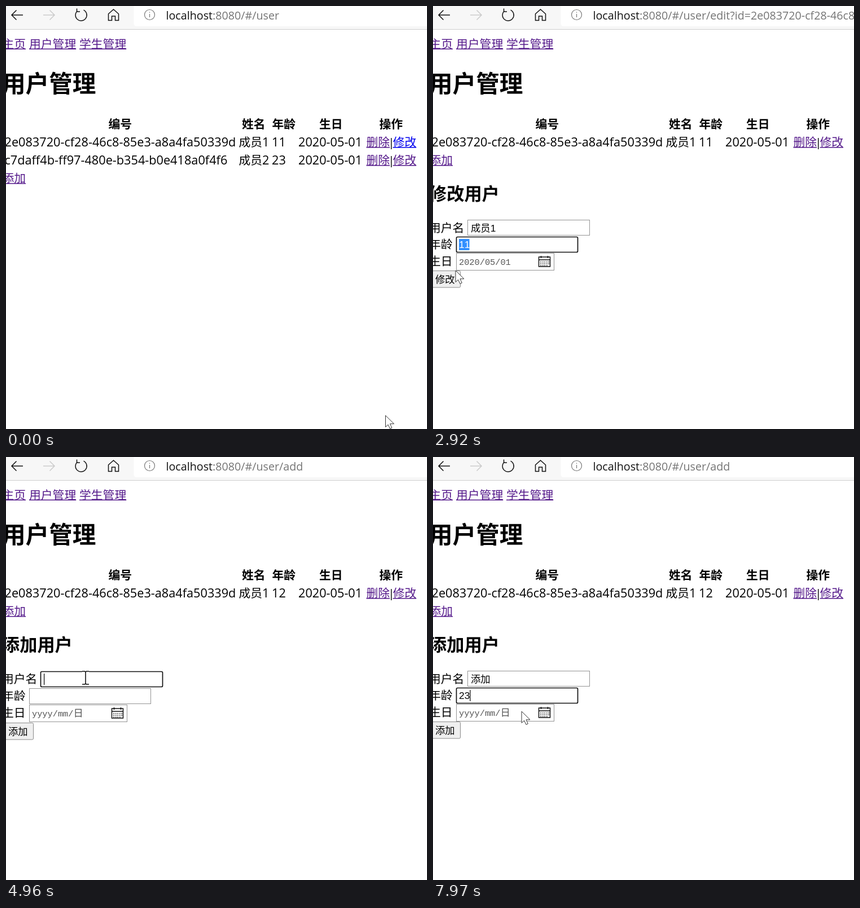
An HTML page for the animation above (8 s loop, 746x750 px).

```html
<!DOCTYPE html>
<html lang="zh-CN">
<head>
<meta charset="utf-8">
<title>用户管理</title>
<style>
  html, body { margin: 0; width: 100%; height: 100%; overflow: hidden; background: #fff; }
  svg { display: block; width: 746px; height: 750px; overflow: hidden; }
  text { font-family: "Open Sans", "Noto Sans CJK SC", "Noto Sans CJK", sans-serif; font-kerning: none; white-space: pre; }
  .b { font-weight: 700; }
  .field { font-family: "Liberation Sans", "Noto Sans CJK SC", "Noto Sans CJK", sans-serif; }
  .date { font-family: "Liberation Mono", "Noto Sans CJK SC", "Noto Sans CJK", monospace; }
  .line { fill: none; stroke: #111; stroke-width: 1.5; }
</style>
</head>
<body>
<svg viewBox="0 0 746 750">
  <rect width="746" height="42" fill="#f7f7f7"/>
  <path d="M0 41.5H746" stroke="#cfcfcf"/>
  <path d="M226.500 0V31Q226.500 36 231.500 36H746V0Z" fill="#fff"/>
  <g class="line">
    <path d="M30 16H10M18.500 7.500L10 16L18.500 24.500"/>
    <path d="M66 16H86M77.500 7.500L86 16L77.500 24.500" stroke="#ccc"/>
    <path d="M137.500 7.200A10 10 0 1 1 126.500 8.700M125.500 4.500V10H131"/>
    <path d="M181.500 14L190.500 6L199.500 14V25.500H193.500V18H187.500V25.500H181.500Z"/>
    <g stroke="#777" stroke-width="1.200">
      <circle cx="254.500" cy="15.500" r="9"/>
      <path d="M254.500 14V20M254.500 10.500V12"/>
    </g>
  </g>
  <g id="page"></g>
</svg>
<script>
const LOOP = 8000;
const ID1 = '2e083720-cf28-46c8-85e3-a8a4fa50339d';
const ID2 = 'c7daff4b-ff97-480e-b354-b0e418a0f4f6';
const HAN = 20.8, LATIN = 21.7, SMALL = 17.33;
const VISITED = '#551a8b', FRESH = '#0000ee', ACTIVE = '#ff0000';

// Pointer legs: start, end, steps, x, y, optional bend x, y
const START = [672.5, 726];
const LEGS = [
  [70, 500, 7, 646, 273, 745, 520],
  [1330, 1620, 5, 705, 245],
  [1900, 2060, 3, 553, 393],
  [2140, 2370, 4, 47, 419],
  [2840, 2920, 2, 40, 469],
  [3000, 3080, 2, 22, 492],
  [3460, 3460, 1, 22, 494],
  [3660, 4250, 8, 17, 282],
  [4550, 4890, 5, 141, 391],
  [7740, 7970, 4, 157, 451]
];
const PRESSES = [[880, 1050], [1700, 1840], [2600, 2670], [2740, 2800], [3460, 3590], [4320, 4470], [4890, 4960]];

// Input-method steps: time, composed text, candidates
const TI = [...'体提题替踢梯啼'], TIAN = [...'天填田甜添舔恬'];
const WORDS = '添加 天价 田家 田佳 天假 天加 天家'.split(' ');
const TYPING = [
  [5650, 't'], [5800, 'ti'], [6210, 'ti', TI], [6350, 'tia', TIAN], [6430, 'tian', TIAN],
  [6580, "tian'j", WORDS], [6730, "tian'ji", WORDS], [6820, "tian'jia", WORDS]
];

const text = (x, y, s, size = HAN, attrs = '') =>
  `<text x="${x}" y="${y}" font-size="${size}" ${attrs}>${s}</text>`;
const bold = (x, y, s, size) => text(x, y, s, size, 'class="b"');
const rect = (x, y, w, h, attrs) =>
  `<rect x="${x}" y="${y}" width="${w}" height="${h}" ${attrs}/>`;
const link = (x, y, s, color = VISITED) =>
  text(x, y, s, HAN, `fill="${color}"`) + rect(x, y + 1, HAN * s.length, 1.5, `fill="${color}"`);
const box = (x, y, w, h, focus) => rect(x + .5, y + .5, w, h,
  `fill="#fff" rx="${focus ? 2 : 0}" stroke="${focus ? '#111' : '#949494'}" stroke-width="${focus ? 1.7 : 1}"`);
const caret = (x, y) => rect(x, y, 1.2, 20, 'fill="#000"');
const within = (t, a, b) => t >= a && t < b;
const pressed = t => PRESSES.some(([a, b]) => within(t, a, b));

function pointerAt(t) {
  let [x, y] = START;
  for (const [a, b, n, tx, ty, bx, by] of LEGS) {
    if (t < a) break;
    const k = b > a ? Math.floor((t - a) / (b - a) * (n - 1) + 1e-6) + 1 : n;
    const p = Math.min(1, k / n), q = 1 - p;
    const mx = bx ?? (x + tx) / 2, my = by ?? (y + ty) / 2;
    x = q * q * x + 2 * q * p * mx + p * p * tx;
    y = q * q * y + 2 * q * p * my + p * p * ty;
  }
  return [x, y];
}

function tableRow(y, id, name, age, del, edit) {
  return text(-2.5, y, id, LATIN) +
    text(412.5, y, `${name[0]}<tspan font-size="${LATIN}">${name[1]}</tspan>`) +
    text(471, y, age, LATIN) + text(518, y, '2020-05-01', LATIN) +
    link(638.5, y, '删除', del) + text(682.7, y, '|', 20, 'text-anchor="middle"') +
    link(685.5, y, '修改', edit);
}

function calendar(y) {
  let dots = '';
  for (let i = 0; i < 14; i++)
    dots += rect(190.5 + i % 5 * 3.5, y + 10 + Math.floor(i / 5) * 3.2, 1.5, 1.5, 'fill="#111"');
  return `<path class="line" d="M187.500 ${y + 2}h20v17h-20zM187.500 ${y + 7}h20M191.500 ${y}v4M203.500 ${y}v4"/>` + dots;
}

function form(t, adding) {
  const typed = adding ? TYPING.filter(s => s[0] <= t).pop() : null;
  const empty = adding && t < 6970;
  const d = empty ? 1 : 0;
  const onName = adding && within(t, 4890, 7500);
  const onAge = adding ? t >= 7500 : t >= 2600;
  const field = (x, y, s, attrs = '') => text(x, y, s, SMALL, 'class="field" ' + attrs);
  let out = bold(-7, 344, adding ? '添加用户' : '修改用户', 31.2) +
    text(-7, 401, '用户名') + box(61, 379 + d, 216, 27, onName);

  if (!adding) out += field(67, 399.5, '成员1');
  else if (!empty) out += field(67, 399.5, '添加') + (onName ? caret(102, 384) : '');
  else if (typed) {
    const w = [...typed[1]].reduce((sum, c) => sum + ({ t: .278, i: .222, j: .222, "'": .191 }[c] || .556), 0) * SMALL;
    out += field(67, 399.5, typed[1]) + caret(67 + w, 384) +
      `<path d="M67 403H${67 + w}" stroke="#111" stroke-dasharray="1.500 1.500"/>`;
  } else if (within(t, 4890, 5420)) out += caret(67, 384);

  out += text(-7, 430 + d, '年龄') + box(41, 409 + d, 215, 27, onAge);
  const age = adding ? (t < 7580 ? '' : t < 7660 ? '2' : '23') : t < 3200 ? '11' : t < 3320 ? '1' : '12';
  const selected = !adding && within(t, 2740, 3200);
  if (selected) out += rect(46, 413, 18.5, 20, 'fill="#3390ff"');
  out += field(46, 429, age, selected ? 'fill="#fff"' : '');
  if (onAge && !selected) out += caret(46 + age.length * .556 * SMALL, 413);

  out += text(-7, 460 + d, '生日') + box(41, 438 + d, 173, 30) +
    text(46, 459 + d, adding ? `yyyy/mm/<tspan font-size="${SMALL}">日</tspan>` : '2020/05/01', 15.3, 'class="date" fill="#555"') +
    calendar(443 + d);
  const by = 469 + 2 * d;
  out += rect(-8, by + .5, 56.5, 29.5, 'rx="2" fill="#efefef" stroke="#8a8a8a"') +
    text(4, by + 22, adding ? '添加' : '修改', SMALL);
  if (empty && typed && typed[2]) out += candidates(typed[2]);
  return out;
}

function candidates(list) {
  const wide = list[0].length > 1;
  const pitch = wide ? 101 : 78.3, end = wide ? 775 : 614;
  let out = rect(63.5, 407.5, end + 57 - 63.5, 55.5, 'fill="#fff" stroke="#1a7fd4" stroke-width="1.500"') +
    rect(63.5, 407, wide ? 102.5 : 79.5, 56.5, 'fill="#0078d7"');
  list.forEach((s, i) => {
    const x = 86 + i * pitch;
    out += text(x - .5, 444.5, i + 1, 16, `fill="${i ? '#808080' : '#fff'}"`) +
      text(x + 13, 446, s, 23, `fill="${i ? '#111' : '#fff'}"`);
  });
  const cx = end + 28;
  return out + `<path d="M${end} 407.500V463" stroke="#1a7fd4" stroke-width="1.500"/>
    <g class="line"><circle cx="${cx}" cy="435.500" r="10.500"/><path d="M${cx - 6} 438Q${cx} 445 ${cx + 6} 438"/></g>
    <circle cx="${cx - 4}" cy="432" r="1.500"/><circle cx="${cx + 4}" cy="432" r="1.500"/>`;
}

const SHAPES = {
  arrow: '<path d="M0 0V20.500L4.600 16.300L8 23.500L11.300 22L8 14.800H15Z" fill="#fff" stroke="#333"/>',
  hand: '<path d="M-2 16V2Q-2 0 0 0T2 2V9Q4 7.500 6 9.500Q8 8.500 9.500 10.500Q13.500 10 13.500 13.500V20Q13.500 29 5 29H3Q-1 29 -3 25L-7.500 17.500Q-8 14 -5 14Z" fill="#fff" stroke="#333" stroke-width="1.100"/><path d="M2 9V14M6 9.500V14.500M9.500 10.500V15" fill="none" stroke="#333"/>',
  beam: '<g fill="none"><path d="M-6 -11H-1.500L0 -10L1.500 -11H6M0 -10V11M-6 12H-1.500L0 11L1.500 12H6" stroke="#fff" stroke-width="4"/><path d="M-6 -11H-1.500L0 -10L1.500 -11H6M0 -10V11M-6 12H-1.500L0 11L1.500 12H6" stroke="#111" stroke-width="1.600"/></g>'
};

function shapeAt(x, y, rows, open) {
  const inside = (l, t, r, b) => x >= l && x <= r && y >= t && y <= b;
  if (inside(638, 230, 727, rows > 1 ? 286 : 254) || inside(0, 230 + 32 * rows, 35, 254 + 32 * rows)) return 'hand';
  if (open && (inside(61, 379, 278, 407) || inside(41, 409, 257, 437))) return 'beam';
  return 'arrow';
}

function scene(t) {
  const rows = t < 1050 ? 2 : 1;
  const editing = within(t, 1840, 3590), adding = t >= 4470;
  const path = editing ? '/edit?id=' + ID1 : adding ? '/add' : '';
  const down = (a, b, color = VISITED) => within(t, a, b) ? ACTIVE : color;
  const heads = [[181.5, '编号'], [418, '姓名'], [471.5, '年龄'], [555, '生日'], [661.5, '操作']];

  let out = text(283.5, 23.5, `localhost<tspan fill="#757575">:8080/#/user${path}</tspan>`, 19.7, 'fill="#111"') +
    link(-6.6, 74.5, '主页') + link(41, 74.5, '用户管理') + link(130, 74.5, '学生管理') +
    bold(-7, 153, '用户管理', 41.6) +
    heads.map(([x, s]) => bold(x, 216.5, s)).join('') +
    tableRow(249, ID1, ['成员', 1], t < 3590 ? 11 : 12, VISITED, down(1700, 1840, t < 1700 ? FRESH : VISITED));
  if (rows > 1) out += tableRow(281, ID2, ['成员', 2], 23, down(880, 1050), VISITED);
  out += link(-6.6, 249 + 32 * rows, '添加', down(4320, 4470));
  if (editing || adding) out += form(t, adding);

  const [x, y] = pointerAt(t);
  if (pressed(t)) out += `<circle cx="${x}" cy="${y}" r="16.500" fill="#ffe500" opacity=".62"/>`;
  return out + `<g transform="translate(${x} ${y})">${SHAPES[shapeAt(x, y, rows, editing || adding)]}</g>`;
}

const page = document.getElementById('page');
let last = '';
function tick(now) {
  const next = scene(now % LOOP);
  if (next !== last) page.innerHTML = last = next;
  requestAnimationFrame(tick);
}
tick(performance.now());
</script>
</body>
</html>
```
